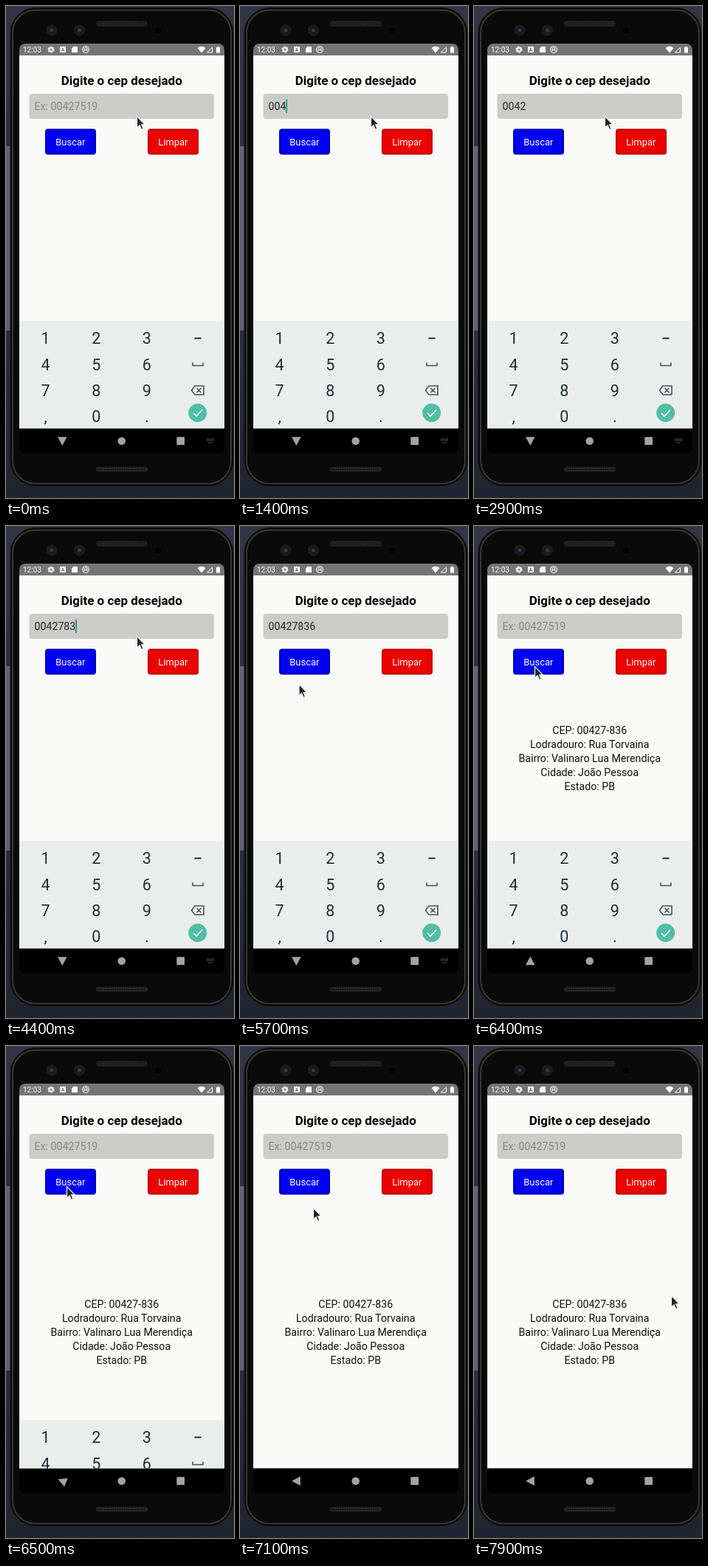
Recreate the animation shown at these times as an HTML page. Size 309 by 667 pixels, loop 8 s.

```html
<!DOCTYPE html>
<html lang="pt-BR">
<head>
<meta charset="utf-8">
<title>Busca de CEP</title>
<style>
  html, body { margin: 0; width: 100%; height: 100%; overflow: hidden; background: #262936; }
  svg { display: block; font-family: Roboto, sans-serif; }
  .mid { text-anchor: middle; }
  .line { fill: none; stroke: #44545b; stroke-width: 1.6; }
  .dark { stroke: #1c2f37; stroke-width: 2; }
</style>
</head>
<body>
<svg width="309" height="667" viewBox="0 0 309 667">
  <defs>
    <linearGradient id="wall" x2="0" y2="1">
      <stop offset="0" stop-color="#323544"/>
      <stop offset=".7" stop-color="#2a2d3b"/>
      <stop offset="1" stop-color="#202330"/>
    </linearGradient>
    <pattern id="mesh" width="3" height="3" patternUnits="userSpaceOnUse">
      <rect width="3" height="3" fill="#292827"/>
      <circle cx="1.5" cy="1.5" r=".9" fill="#111"/>
    </pattern>
    <clipPath id="app"><rect x="18" y="67" width="278" height="505.600"/></clipPath>
  </defs>

  <rect width="309" height="667" fill="url(#wall)"/>
  <rect y="190" width="12" height="250" fill="#606272"/>
  <rect x="6" y="2.500" width="302" height="648" rx="34" fill="#080808" stroke="#121212"/>
  <rect x="9" y="5.500" width="296" height="642" rx="31" fill="#0a0a0a" stroke="#383834" stroke-width="2"/>
  <rect x="122" y="20.500" width="70" height="7" rx="3.500" fill="url(#mesh)"/>
  <rect x="122" y="624.500" width="70" height="7" rx="3.500" fill="url(#mesh)"/>
  <g fill="#191a20" stroke="#22232a">
    <circle cx="62" cy="33" r="7"/><circle cx="99.500" cy="33" r="7"/>
    <circle cx="206" cy="33" r="5" fill="#030303" stroke="#101010"/>
  </g>
  <g fill="#34364a"><circle cx="62" cy="33" r="2.500"/><circle cx="99.500" cy="33" r="2.500"/></g>

  <rect x="18" y="51" width="278" height="556" rx="9"/>
  <path d="M18 68V60Q18 51 27 51H287Q296 51 296 60V68Z" fill="#757575"/>
  <g fill="#fff">
    <text x="23" y="63" font-size="10">12:03</text>
    <circle cx="61" cy="59" r="2.600" fill="none" stroke="#fff" stroke-width="2"/>
    <circle cx="61" cy="59" r="4" fill="none" stroke="#fff" stroke-width="1.200" stroke-dasharray="2.100"/>
    <rect x="73" y="55" width="8" height="8" rx="1"/>
    <path d="M75 62L77 57L79 62M76 60.500H78" fill="none" stroke="#757575"/>
    <path d="M89 57.500L91.500 55H97V63H89Z"/>
    <circle cx="108" cy="59" r="4.300" fill="none" stroke="#fff" stroke-width="1.100"/>
    <path d="M106 61V58.500A2 2 0 0 1 110 58.500V61M106 59.500H110" fill="none" stroke="#fff"/>
    <path d="M259.500 57Q265 52.500 270.500 57L265 63.500Z"/>
    <path d="M272.500 63L279.500 56V63Z" fill="none" stroke="#fff"/>
    <path d="M285 56H286.300V55H288.700V56H290V63.500H285Z"/>
  </g>

  <g clip-path="url(#app)">
    <rect x="18" y="67" width="278" height="506" fill="#f9f9f7"/>
    <text class="mid" x="156.700" y="107" font-size="17" font-weight="700">Digite o cep desejado</text>
    <rect x="31.500" y="119" width="250.500" height="34" rx="4" fill="#cbcbc9"/>
    <text id="field" x="38.500" y="141" font-size="14.200"></text>
    <rect id="caret" y="126.500" width="1.700" height="18.500" fill="#16917f"/>
    <g class="mid" font-size="13" stroke-width="2">
      <g id="search">
        <rect x="54" y="167.500" width="67" height="33" rx="3" fill="#0000f4" stroke="#0000b8"/>
        <text x="87.300" y="189" fill="#fff">Buscar</text>
      </g>
      <rect x="193" y="167.500" width="67" height="33" rx="3" fill="#ec0000" stroke="#bd0000"/>
      <text x="226.300" y="189" fill="#fff">Limpar</text>
    </g>
    <g id="result" class="mid" font-size="14.200" fill="#111"></g>
    <g id="keyboard">
      <rect x="18" y="427" width="278" height="146" fill="#e9eeed"/>
      <g id="keys" class="mid" font-size="21.500" fill="#1c2f37"></g>
      <path d="M255.500 450.500H264.500" class="line dark"/>
      <path d="M253 483.500V487.500H267V483.500" class="line"/>
      <path d="M251.500 521L256 515H268V527H256ZM258.500 518L264.500 524M264.500 518L258.500 524" class="line"/>
      <circle cx="259.700" cy="551.500" r="12.500" fill="#50bea5"/>
      <path d="M254 552L258 556L266 547.500" fill="none" stroke="#fff" stroke-width="1.700"/>
    </g>
  </g>

  <g fill="#a3a3a3">
    <path id="back" d="M-6.300 0L5.500 -6.300V6.300Z"/>
    <circle cx="156.700" cy="589.700" r="5.300"/>
    <rect x="231.300" y="584.300" width="10.700" height="10.700" rx=".5"/>
    <path id="imeIcon" d="M272 587H282M272 589H282M274 592H280" stroke="#8a8a8a" stroke-width="1.200" stroke-dasharray="1.200 1"/>
  </g>
  <path id="mouse" d="M0 0V15.500L3.600 12.200L6 18L8.500 17L6.100 11.300H10.800Z" fill="#222" stroke="#fff" stroke-width="1.100"/>
</svg>

<script>
const $ = id => document.getElementById(id);
const text = (x, y, s) => `<text x="${x}" y="${y}">${s}</text>`;
const move = (el, x, y, turn = 0) =>
  el.setAttribute('transform', `translate(${x} ${y}) rotate(${turn})`);
const show = (el, on) => el.setAttribute('visibility', on ? 'visible' : 'hidden');

const LOOP = 8000, STEP = 100;
const CEP = '00427836';
const SUBMIT = 6300;
const keyTimes = [400, 500, 1400, 2200, 3700, 4000, 4400, 4900];
const caretOff = [[0, 300], [1100, 1400], [2900, 3200], [5300, 5800], [SUBMIT, LOOP]];

// [time, x, y] of the pointer tip
const pointerPath = [
  [0, 177.5, 149.5], [5400, 177.5, 149.5], [5500, 164, 157],
  [5600, 118, 191], [5700, 80, 214.5], [5800, 80, 203], [5900, 82.5, 190.5],
  [7000, 82.5, 190.5], [7100, 99.5, 219.5], [7200, 127, 298], [7300, 158, 392],
  [7400, 184, 465], [7500, 206, 496], [7600, 229, 478], [7700, 248, 430],
  [7800, 261, 376], [7900, 267.5, 338.5]
];

$('result').innerHTML = [
  'CEP: 00427-836',
  'Lodradouro: Rua Torvaina',
  'Bairro: Valinaro Lua Merendiça',
  'Cidade: João Pessoa',
  'Estado: PB'
].map((s, i) => text(156.7, 282 + i * 19, s)).join('');

$('keys').innerHTML = ['123', '456', '789', ',0.'].map((row, r) =>
  [...row].map((key, c) => text(53.5 + c * 68.7, 458.3 + r * 35.3, key)).join('')).join('');

function pointerAt(t) {
  const i = pointerPath.findLastIndex(p => p[0] <= t);
  const a = pointerPath[i], b = pointerPath[i + 1] || a;
  const k = b === a ? 0 : (t - a[0]) / (b[0] - a[0]);
  return [a[1] + (b[1] - a[1]) * k, a[2] + (b[2] - a[2]) * k];
}

function draw(now) {
  const t = Math.floor(now % LOOP / STEP) * STEP;
  const done = t >= SUBMIT;
  const typed = done ? 0 : keyTimes.filter(k => t >= k).length;
  $('field').textContent = typed ? CEP.slice(0, typed) : 'Ex: 00427519';
  $('field').setAttribute('fill', typed ? '#262626' : '#858583');
  $('caret').setAttribute('x', 38.3 + typed * 7.98);
  show($('caret'), !caretOff.some(([from, to]) => t >= from && t < to));
  $('search').setAttribute('opacity', t >= 6100 && !done ? 0.4 : 1);

  show($('result'), done);
  move($('result'), 0, t >= 6500 ? 73 : 0);
  move($('keyboard'), 0, t < 6500 ? 0 : t < 6600 ? 80 : 146);
  // the back arrow swings from down through up to left
  const spin = Math.min(1, Math.max(0, (t - SUBMIT) / 300));
  move($('back'), 76.3, 589.7, -90 - 270 * Math.sin(spin * Math.PI / 2) ** 0.585);
  show($('imeIcon'), t < 6400);
  move($('mouse'), ...pointerAt(t));
  requestAnimationFrame(draw);
}
requestAnimationFrame(draw);
</script>
</body>
</html>
```
